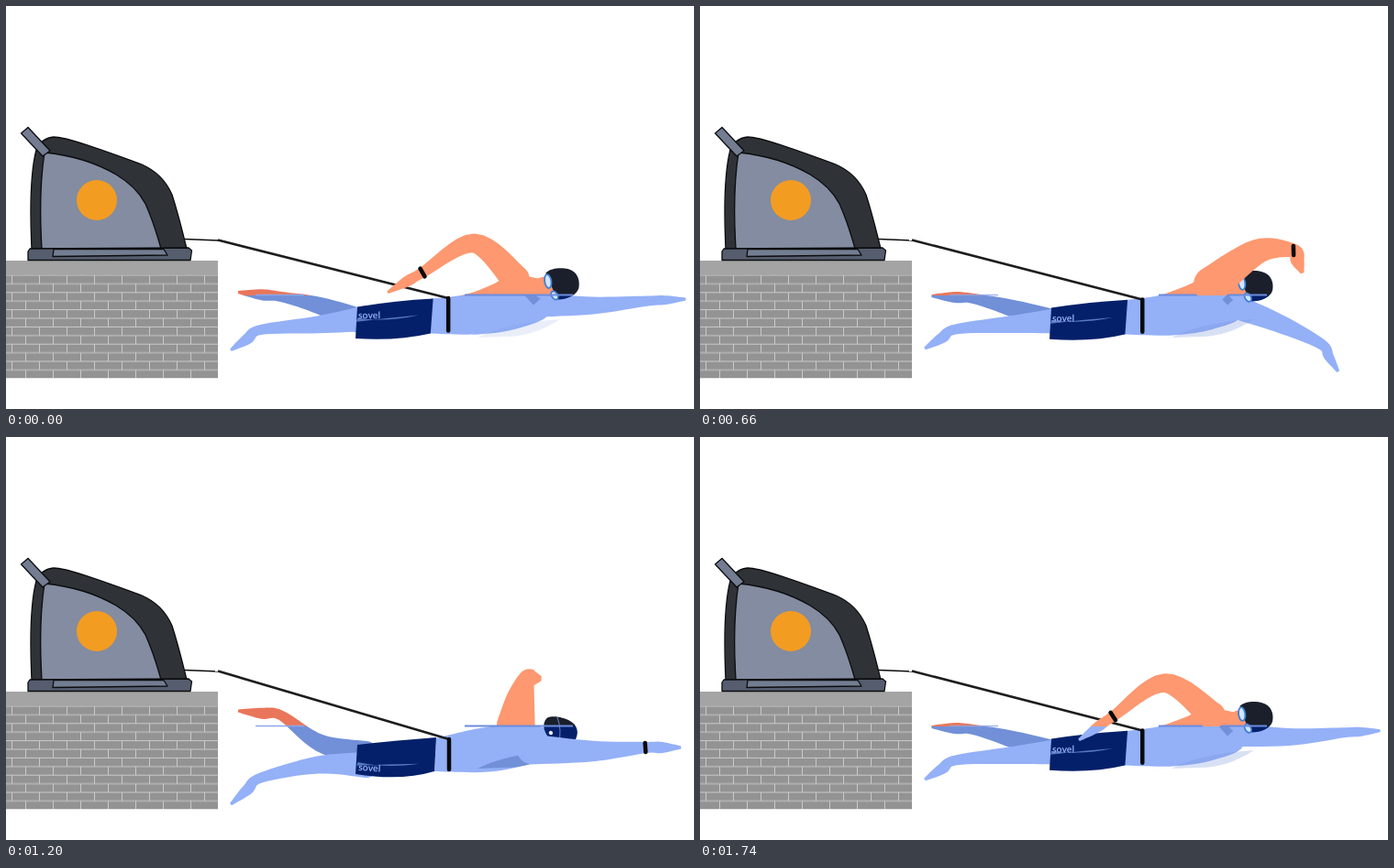
An HTML page that plays this animation: 750x440 px, repeating every 1.8 s.

```html
<!DOCTYPE html>
<html lang="en">
<head>
<meta charset="utf-8">
<title>Tethered swimmer</title>
<style>
html, body { margin: 0; width: 100%; height: 100%; overflow: hidden; background: #fff; }
svg { display: block; width: 750px; height: 440px; }
text { font: 700 10.5px Lato, "Open Sans", sans-serif; }
</style>
</head>
<body>
<svg viewBox="0 0 750 440" xmlns="http://www.w3.org/2000/svg">
  <defs id="defs">
    <pattern id="bricks" x="6" y="293.5" width="30" height="18.8" patternUnits="userSpaceOnUse">
      <rect width="30" height="18.8" fill="#939393"/>
      <path d="M0 .5H30M0 9.9H30M.5 .5V9.9M15.5 9.9V19" stroke="#cacaca" fill="none"/>
    </pattern>
  </defs>

  <rect y="278" width="231" height="16" fill="#a4a4a4"/>
  <rect y="293.5" width="231" height="112.9" fill="url(#bricks)"/>

  <g stroke="#0b0c0e" stroke-width="1.3" stroke-linejoin="round">
    <path fill="#2f3337" d="M28 265C26 222 27 180 33 157Q39 144 52 143C66 143 104 157 148 173Q171 183 181 206Q188 228 197 265Z"/>
    <path fill="#838ca0" d="M39 265C37 232 37 192 42 160C72 163 98 171 120 184Q142 197 152 216Q161 236 169 265Z"/>
    <path fill="#737c91" d="M16.5 139L24 132.5L48 158L40 164Z"/>
    <path fill="#555d6e" d="M26 265L199 264L202.5 267L201 277.5H24V268Z"/>
    <path fill="#737e92" d="M52 265.5H172L176 272L51 273.5Z"/>
    <path fill="none" d="M195 254.5L232 256"/>
  </g>
  <circle cx="99" cy="212" r="22" fill="#f39c22"/>

  <g id="swimmer"></g>
</svg>
<script>
const LOOP = 1800, STEP = 60, KICK = 600, WATER = 315.5;
const SVG = 'http://www.w3.org/2000/svg';
const swimmer = document.getElementById('swimmer');

function add(tag, attrs, parent = swimmer) {
  const node = document.createElementNS(SVG, tag);
  set(node, attrs);
  return parent.appendChild(node);
}
function set(node, attrs) {
  for (const name in attrs) node.setAttribute(name, attrs[name]);
}

const mix = (a, b, u) => a.map((v, i) => v + (b[i] - v) * u);
const clamp = v => Math.min(1, Math.max(0, v));
const smooth = u => u * u * (3 - 2 * u);
const xy = p => p.slice(0, 2).map(v => v.toFixed(2)).join(' ');
const pairs = list => list.flatMap((v, i) => i % 2 ? [] : [[v, list[i + 1]]]);

function catmull(a, b, c, d, u) {
  return b.map((_, k) => b[k] + .5 * u * (c[k] - a[k]
    + u * (2 * a[k] - 5 * b[k] + 4 * c[k] - d[k] + u * (3 * (b[k] - c[k]) + d[k] - a[k]))));
}

// The body rolls between these two poses: breathing side up, and face down.
const breathing = {
  torso: [462, 318, 500, 314, 530, 302, 554, 289, 574, 303, 591, 334, 560, 350, 515, 357, 461, 356],
  shorts: [383, 327, 425, 320, 465, 318, 462, 356, 425, 364, 381, 362],
  belt: [482, 317, 482, 353],
  label: [384, 337, -1, 0],
  head: [606, 300, 0, 585, 304],
  nearShoulder: [552, 290],
  farShoulder: [581, 329]
};
const faceDown = {
  torso: [469, 329, 501, 321, 528, 316, 560, 311, 587, 321, 594, 347, 555, 361, 517, 366, 467, 365],
  shorts: [383, 336, 428, 331, 469, 328, 467, 365, 430, 376, 381, 368],
  belt: [483, 330, 483, 363],
  label: [384, 364, 4, -10],
  head: [604, 321, 18, 594, 328],
  nearShoulder: [573, 341],
  farShoulder: [556, 314]
};

// Stroke key poses: time, elbow, wrist, hand curl in degrees.
const nearStroke = [
  [0, 510, 259, 454, 291, 0],
  [240, 522, 245, 469, 268, 5],
  [660, 608, 268, 647, 267, 70],
  [960, 630, 334, 687, 328, 4],
  [1200, 640, 343, 697, 339, 4],
  [1440, 534, 371, 560, 418, 35],
  [1620, 504, 297, 458, 342, 0]
];
const farStroke = [
  [0, 640, 327, 700, 322, 2],
  [240, 640, 328, 700, 322, 2],
  [660, 630, 346, 677, 369, 32],
  [840, 540, 348, 535, 384, 0],
  [960, 510, 311, 493, 322, 0],
  [1200, 561, 285, 568, 263, 75],
  [1440, 605, 309, 680, 309, 10],
  [1680, 640, 326, 700, 322, 2]
];

function arm(shoulder, stroke, t) {
  const n = stroke.length;
  const row = i => stroke[(i + n) % n];
  const i = stroke.findLastIndex(r => r[0] <= t);
  const end = i + 1 < n ? row(i + 1)[0] : LOOP;
  const u = (t - row(i)[0]) / (end - row(i)[0]);
  const [, ex, ey, wx, wy, curl] = catmull(row(i - 1), row(i), row(i + 1), row(i + 2), u);
  const forearm = Math.hypot(wx - ex, wy - ey);
  const angle = Math.atan2(wy - ey, wx - ex);
  const bend = angle + curl * Math.PI / 180;
  const reach = forearm * .68;
  return {
    joints: [shoulder, [ex, ey], [wx, wy], [wx + Math.cos(bend) * reach, wy + Math.sin(bend) * reach]],
    angle,
    girth: Math.sqrt(60 / Math.max(20, forearm)) // a foreshortened arm looks thicker
  };
}

// Tapered limb: a smooth centre line widened by the radius at each joint.
function limb([a, b, c, d], radii) {
  const nodes = [a, b, c, mix(c, d, .45), d].map((p, i) => [...p, radii[i]]);
  const last = nodes.length - 1, line = [];
  for (let i = 0; i < last; i++)
    for (let s = 0; s < 8; s++)
      line.push(catmull(nodes[Math.max(i - 1, 0)], nodes[i], nodes[i + 1], nodes[Math.min(i + 2, last)], s / 8));
  line.push(nodes[last]);
  const side = sign => line.map(([x, y, r], i) => {
    const from = line[Math.max(i - 1, 0)], to = line[Math.min(i + 1, line.length - 1)];
    const dx = to[0] - from[0], dy = to[1] - from[1], len = Math.hypot(dx, dy) || 1;
    return [x - sign * dy / len * r, y + sign * dx / len * r];
  });
  const left = side(1), right = side(-1).reverse(), r = radii[0];
  return `M${left.concat(right).map(xy).join('L')}A${r} ${r} 0 0 0 ${xy(left[0])}Z`;
}

function smoothOutline(values) {
  const p = pairs(values), n = p.length;
  let d = 'M' + xy(p[0]);
  for (let i = 0; i < n - 1; i++) {
    const a = p[Math.max(i - 1, 0)], b = p[i], c = p[i + 1], e = p[Math.min(i + 2, n - 1)];
    d += `C${xy(b.map((v, k) => v + (c[k] - a[k]) / 6))} ${xy(c.map((v, k) => v - (e[k] - b[k]) / 6))} ${xy(c)}`;
  }
  return d + 'Z';
}

function shortsOutline(values) {
  const [a, b, c, d, e, f] = pairs(values).map(xy);
  return `M${a}Q${b} ${c}L${d}Q${e} ${f}Z`;
}

// Paint that switches colour at the water level.
function waterPaint(id, above, below) {
  const gradient = add('linearGradient', { id, gradientUnits: 'userSpaceOnUse', x1: 0, x2: 0, y1: 0, y2: 440 },
    document.getElementById('defs'));
  for (const color of [above, below]) add('stop', { 'stop-color': color, offset: WATER / 440 }, gradient);
  return gradient;
}
waterPaint('skin', '#fd9870', '#94b0f7');
waterPaint('farSkin', '#e9765a', '#7190d8');
const capPaint = waterPaint('capFill', '#1a1f2b', '#04206a');
const skin = 'url(#skin)', farSkin = 'url(#farSkin)';

const farLeg = add('path', { fill: farSkin });
const farArm = add('path', { fill: skin });
const nearLeg = add('path', { fill: skin });
const neck = add('path', { fill: skin });
const torso = add('path', { fill: skin });
const chestShade = add('path', { fill: '#7190d8', d: 'M514 362Q545 346 604 342Q575 361 545 361Z' });
const neckShade = add('path', { fill: '#7190d8', d: `M565 ${WATER}H587L575 ${WATER + 11}Z` });
const shorts = add('path', { fill: '#04206a' });
const label = add('g', {});
const stripe = add('path', { fill: '#5878c4', d: 'M-1 1Q30 6 66 -2Q32 1 -2 5Z' }, label);
add('text', { fill: '#8dabf0' }, label).textContent = 'sovel';

const face = add('circle', { r: 12, fill: skin });
const head = add('g', {});
const cap = add('path', { fill: 'url(#capFill)' }, head);
const badge = add('g', {}, head);
add('path', { d: 'M-8 -14Q2 -2 3 15', stroke: '#6d83bd', fill: 'none' }, badge);
add('circle', { cx: -9, cy: 5, r: 2.2, fill: '#e8eefc' }, badge);
const goggles = add('g', { fill: '#d3e5fb', stroke: '#3f7fd4', 'stroke-width': 1.8 }, head);
add('ellipse', { cx: -15, cy: -2, rx: 3.6, ry: 7.5, transform: 'rotate(-12 -15 -2)' }, goggles);
add('ellipse', { cx: -7, cy: 13, rx: 3.2, ry: 5, transform: 'rotate(-35 -7 13)' }, goggles);

add('path', { stroke: '#6c8cdc', 'stroke-width': 2.2, d: `M500 ${WATER}H618` });
const footLine = add('path', { stroke: '#8ca7e8', 'stroke-width': 1.3, d: `M272 ${WATER}H325` });
const rope = add('path', { stroke: '#1d1d1f', 'stroke-width': 2.6 });
const belt = add('path', { stroke: '#090a0d', 'stroke-width': 4.5, 'stroke-linecap': 'round' });
const nearArm = add('path', { fill: skin });
const watch = add('path', { stroke: '#08090b', 'stroke-width': 4.5, d: 'M0 -5V5', 'stroke-linecap': 'round' });

const LEG = [14, 9.5, 5.5, 6, 1.5];

function drawLegs(t, roll) {
  const kick = Math.cos(2 * Math.PI * t / KICK), lean = 1 - 2 * roll;
  set(nearLeg, { d: limb([
    [392, 348 - 10 * lean],
    [340, 343 + 9 * kick - 6 * lean],
    [284 - 6 * kick, 339 + kick * (22 - 11 * lean)],
    [245, 352 + kick * (34 - 15 * lean)]
  ], LEG) });
  set(farLeg, { d: limb([
    [392, 350 - 4 * kick],
    [342, 342 - 12 * kick - 4 * lean],
    [291 + 9 * kick, 336 - kick * (24 - 8 * lean)],
    [250 + 3 * kick, 341 - kick * (34 - 8 * lean)]
  ], LEG) });
  set(footLine, { opacity: Math.abs(kick) });
}

function drawHead([x, y, tilt, faceX, faceY], shoulder, chest, roll) {
  const seen = clamp(2.5 - 4 * roll);
  set(face, { cx: faceX, cy: faceY });
  set(neck, { d: `M${shoulder}L${faceX} ${faceY - 9}L${faceX + 6} ${faceY + 10}L${chest}Z` });
  set(head, { transform: `translate(${x} ${y}) rotate(${tilt})` });
  set(cap, {
    transform: `scale(1 ${1 - .18 * roll})`,
    d: `M-18 -11C-12 -18 0 -18 6 -17C16 -15 20 -6 19 3C18 11 8 17 -3 18C${-7 - 9 * roll} 10 ${-10 - 12 * roll} 0 -18 -11Z`
  });
  set(capPaint, { gradientTransform: `scale(1 ${1 / (1 - .18 * roll)}) rotate(${-tilt}) translate(${-x} ${-y})` });
  set(goggles, { opacity: seen });
  set(neckShade, { opacity: seen });
  set(badge, { opacity: 1 - seen });
}

function draw(t) {
  const roll = smooth(.5 - .5 * Math.cos(2 * Math.PI * (t - 300) / LOOP));
  const pose = part => mix(breathing[part], faceDown[part], roll);

  drawLegs(t, roll);
  const near = arm(pose('nearShoulder'), nearStroke, t);
  const far = arm(pose('farShoulder'), farStroke, t);
  set(nearArm, { d: limb(near.joints, [16, 11, 6, 6, 1.5].map(r => r * near.girth)) });
  set(farArm, { d: limb(far.joints, [13, 9.5, 5.5, 5, 1.5].map(r => r * far.girth)) });
  set(watch, { transform: `translate(${near.joints[2]}) rotate(${near.angle * 180 / Math.PI})` });

  const trunk = pose('torso');
  set(torso, { d: smoothOutline(trunk) });
  set(shorts, { d: shortsOutline(pose('shorts')) });
  set(chestShade, { opacity: roll });
  drawHead(pose('head'), trunk.slice(6, 8), trunk.slice(10, 12), roll);

  const [x, y, angle, stripeY] = pose('label');
  set(label, { transform: `translate(${x} ${y}) rotate(${angle})` });
  set(stripe, { transform: `translate(0 ${stripeY})` });

  const [top, low] = pairs(pose('belt')).map(xy);
  set(belt, { d: `M${top}L${low}` });
  set(rope, { d: `M231 255.5L${top}` });
}

function tick() {
  draw(Math.floor(performance.now() % LOOP / STEP) * STEP);
  requestAnimationFrame(tick);
}
tick();
</script>
</body>
</html>
```
